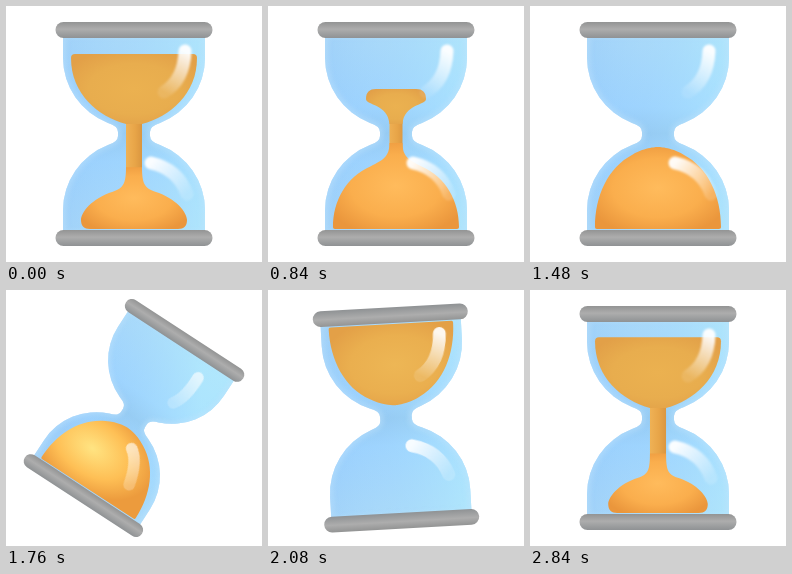
Animation, 256 px wide and 256 px high, one loop 2.88 s. Source, as an HTML page:

```html
<!DOCTYPE html>
<html lang="en">
<head>
<meta charset="utf-8">
<title>Hourglass</title>
<style>
html, body { margin: 0; width: 100%; height: 100%; overflow: hidden; background: #fff; }
svg { display: block; width: 100%; height: 100%; }
</style>
</head>
<body>
<svg viewBox="0 0 256 256">
  <defs>
    <linearGradient id="glassFill" gradientUnits="userSpaceOnUse" x1="0" y1="30" x2="0" y2="226">
      <stop offset="0" stop-color="#aad8f8"/>
      <stop offset=".36" stop-color="#9dd2fe"/>
      <stop offset=".5" stop-color="#92c6f0"/>
      <stop offset=".64" stop-color="#9dd2fe"/>
      <stop offset="1" stop-color="#aad8f8"/>
    </linearGradient>
    <linearGradient id="sheen" gradientUnits="userSpaceOnUse" x1="-75" y1="128" x2="75" y2="128">
      <stop offset="0" stop-color="#8fc4f8" stop-opacity=".35"/>
      <stop offset=".4" stop-color="#a4dcff" stop-opacity=".2"/>
      <stop offset="1" stop-color="#b4f0ff" stop-opacity=".6"/>
    </linearGradient>
    <linearGradient id="capFill" x1="0" y1="0" x2="0" y2="1">
      <stop offset="0" stop-color="#939494"/>
      <stop offset=".45" stop-color="#adadad"/>
      <stop offset="1" stop-color="#8f9294"/>
    </linearGradient>
    <radialGradient id="topFill" cx=".5" cy=".5" r=".6">
      <stop offset="0" stop-color="#ebb150"/>
      <stop offset=".6" stop-color="#e8ad4e"/>
      <stop offset="1" stop-color="#e2a048"/>
    </radialGradient>
    <radialGradient id="moundFill" cx=".5" cy=".5" r=".6">
      <stop offset="0"/><stop offset=".6"/><stop offset="1"/>
    </radialGradient>
    <linearGradient id="stemFill" gradientUnits="userSpaceOnUse" x1="-9" y1="0" x2="9" y2="0">
      <stop offset="0" stop-color="#f0b357"/>
      <stop offset=".55" stop-color="#e8a548"/>
      <stop offset="1" stop-color="#d8943f"/>
    </linearGradient>
    <linearGradient id="glint0" gradientUnits="userSpaceOnUse">
      <stop offset="0" stop-color="#fff"/><stop offset="1" stop-color="#fff"/>
    </linearGradient>
    <linearGradient id="glint1" gradientUnits="userSpaceOnUse">
      <stop offset="0" stop-color="#fff"/><stop offset="1" stop-color="#fff"/>
    </linearGradient>
    <path id="glass" d="M-71 28V52A71 70 0 0 0 -26 117Q-16 120 -16 126V130Q-16 136 -26 139A71 70 0 0 0 -71 204V228H71V204A71 70 0 0 0 26 139Q16 136 16 130V126Q16 120 26 117A71 70 0 0 0 71 52V28Z"/>
    <clipPath id="inside"><use href="#glass"/></clipPath>
    <filter id="soft" x="-20%" y="-20%" width="140%" height="140%"><feGaussianBlur stdDeviation="2.5"/></filter>
    <filter id="haze" filterUnits="userSpaceOnUse" x="-90" y="20" width="180" height="216"><feGaussianBlur stdDeviation=".8"/></filter>
  </defs>
  <g id="timer">
    <use href="#glass" fill="url(#glassFill)"/>
    <use href="#glass" fill="url(#sheen)"/>
    <g clip-path="url(#inside)">
      <use href="#glass" fill="none" stroke="#bfe3fd" stroke-width="6" opacity=".5" filter="url(#soft)"/>
    </g>
    <rect id="stem" fill="url(#stemFill)"/>
    <path id="topSand" fill="url(#topFill)"/>
    <path id="mound" fill="url(#moundFill)"/>
    <g fill="none" stroke-width="13" stroke-linecap="round" filter="url(#haze)">
      <path id="shine0" stroke="url(#glint0)"/>
      <path id="shine1" stroke="url(#glint1)"/>
    </g>
    <rect x="-78.5" y="16" width="157" height="16" rx="8" fill="url(#capFill)"/>
    <rect x="-78.5" y="224" width="157" height="16" rx="8" fill="url(#capFill)"/>
  </g>
</svg>
<script>
const LOOP = 2880, STEP = 40, TURN_AT = 1520, TURN_FOR = 670, BASE = 223;

const $ = id => document.getElementById(id);
const set = (el, attrs) => { for (const k in attrs) el.setAttribute(k, attrs[k]); };
const mix = (a, b, k) => a.map((v, i) => v + (b[i] - v) * k);
const ease = p => p < .5 ? 4 * p ** 3 : 1 - 4 * (1 - p) ** 3;

// time since the turn ended: surface y, surface half width, mound y, mound half width, stem half width
const POUR = [
  [0, 34, 63, 222, 9, 9],
  [170, 38, 63, 212, 11, 8.5],
  [690, 48, 63, 182, 53, 8],
  [1210, 68, 50, 165, 61, 7.5],
  [1530, 83, 30, 154, 63, 6.5],
  [1770, 103, 9, 146, 63, 5],
  [2000, 141, 0, 141, 63, 0]
];

// outer end, bend and inner end of each glint: before, late in, and after the turn
const GLINTS = [
  [[53, 188, 44, 163, 17, 157], [-14, 211, -13, 178, 15, 162], [-51, 211, -50, 182, -30, 170]],
  [[51, 45, 50, 74, 30, 86], [-11, 69, -5, 90, 20, 101], [-53, 68, -44, 93, -17, 99]]
];
const LATE = .74;

// sand colours from core to rim: upright below, upright above, extra light while tilted
const WARM = [[255, 187, 92], [250, 174, 77], [234, 150, 60]];
const GOLD = [[235, 177, 80], [232, 173, 78], [226, 160, 72]];
const GLOW = [[14, 75, 70], [8, 32, 14], [4, 10, 2]];

function pourAt(q) {
  const i = POUR.findIndex(k => k[0] > q);
  if (i < 0) return POUR[POUR.length - 1];
  const a = POUR[i - 1], b = POUR[i];
  return mix(a, b, (q - a[0]) / (b[0] - a[0]));
}

// Builds a closed shape from its right half: a start point and cubic segments.
function mirrored(start, curves) {
  const pts = [start, ...curves.flat()];
  const left = pts.map(([x, y]) => [-x, y]).reverse();
  return `M${start}C${pts.slice(1).join(" ")}L${left[0]}C${left.slice(1).join(" ")}Z`;
}

function topShape(y, w, s) {
  const r = Math.min(10, w, 4 + (63 - w) * .3), side = y + r;
  return mirrored([w - r, y], [
    [[w - r / 3, y], [w, y + r / 3], [w, side]],
    [[w, side + (118 - side) * w / 115], [Math.max(s, .009 * w * w), Math.max(side, 86 + .39 * w)], [s, 118]]
  ]);
}

function moundShape(y, w, s) {
  const h = BASE - y, flare = 2.6 * s;
  const r = Math.min(9, .3 * h, 2 + .8 * (63 - w));
  return mirrored([s, y - flare], [
    [[s, y - flare * .2], [Math.max(s, .2 * w), y], [Math.max(s, .4 * w), y + .09 * h]],
    [[.8 * w, y + .25 * h], [w, y + .6 * h], [w, BASE - r]],
    [[w, BASE - r / 3], [w - r / 3, BASE], [w - r, BASE]]
  ]);
}

function drawSand(q, turn, tilt) {
  const [, y, w, my, mw, s] = pourAt(q);
  const fall = Math.min(1, q / 150) ** 2;
  const from = Math.max(112, y), to = 118 + (BASE - 118) * fall;
  set($("stem"), { x: -s, y: from, width: 2 * s, height: Math.max(0, to - from), rx: Math.min(s, 4) });
  set($("topSand"), { d: y < 105 ? topShape(y, w, s) : "" });
  set($("mound"), { d: q > 150 ? moundShape(my, mw, s) : "" });
  set($("moundFill"), { cx: .5 - .3 * tilt });
  [...$("moundFill").children].forEach((stop, i) => {
    const rgb = mix(WARM[i], GOLD[i], turn ** 4).map((v, n) => Math.round(v + GLOW[i][n] * tilt));
    set(stop, { "stop-color": `rgb(${rgb})` });
  });
}

function drawGlint(i, turn, tilt) {
  const [a, b, c] = GLINTS[i];
  const p = turn < LATE ? mix(a, b, turn / LATE) : mix(b, c, (turn - LATE) / (1 - LATE));
  const [x1, y1, bx, by, x2, y2] = p;
  set($("shine" + i), { d: `M${x1} ${y1}Q${bx} ${by} ${x2} ${y2}` });
  const grad = $("glint" + i);
  set(grad, { x1, y1, x2, y2 });
  const ends = mix([.15, .95], [.95, .1], i ? 1 - turn : turn);
  [...grad.children].forEach((stop, n) => set(stop, { "stop-opacity": ends[n] * (1 - .4 * tilt) }));
}

function draw(ms) {
  const t = Math.floor(ms % LOOP / STEP) * STEP;
  // A finished half turn looks the same as no turn.
  const turn = ease(Math.min(1, Math.max(0, (t - TURN_AT) / TURN_FOR))) % 1;
  const angle = turn * 180, tilt = Math.sin(turn * Math.PI);
  const size = 1 - .2 * tilt;
  set($("timer"), { transform: `translate(128 128) rotate(${angle}) scale(${size}) translate(0 -128)` });
  set($("sheen"), { gradientTransform: `rotate(${-angle} 0 128)` });
  drawSand((t - TURN_AT - TURN_FOR + LOOP) % LOOP, turn, tilt);
  drawGlint(0, turn, tilt);
  drawGlint(1, turn, tilt);
}

const began = performance.now();
function tick() {
  draw(performance.now() - began);
  requestAnimationFrame(tick);
}
tick();
</script>
</body>
</html>
```
